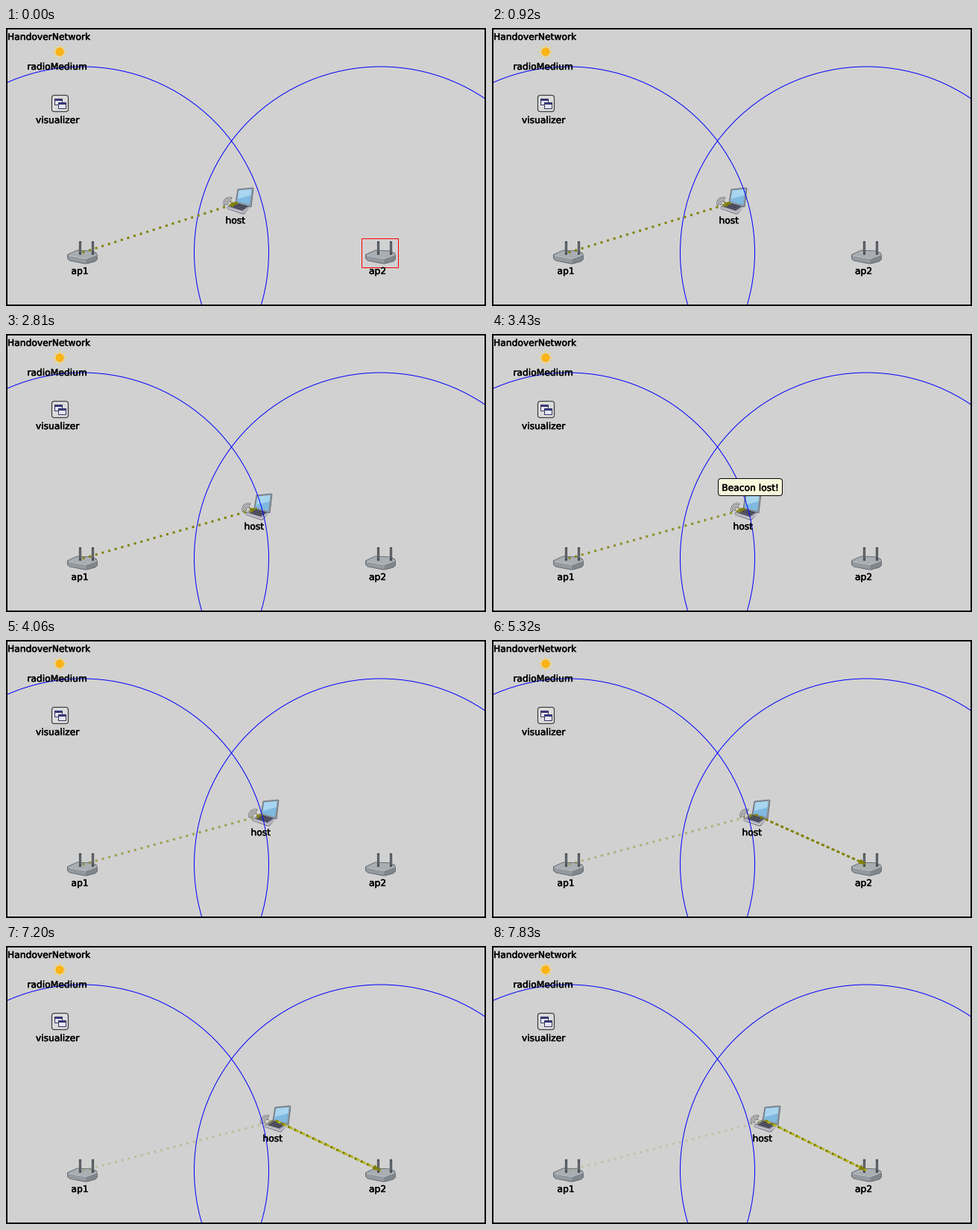
Write a matplotlib script that moves like this. It is 644 by 374 pixels and loops after 8000 ms.

```python
import math

import numpy as np
import matplotlib.pyplot as plt
from matplotlib.animation import FuncAnimation
from matplotlib.patches import Circle, FancyBboxPatch, Polygon, Rectangle
from matplotlib.patheffects import withStroke
from matplotlib.transforms import Affine2D

W, H, DPI = 644, 374, 100
PX = 72 / DPI
LOOP, STEP = 8000, 20
OLIVE = "#808000"
AP1, AP2 = (102.5, 302), (502.5, 302)
HOST_Y = 232

# Start of every simulation step (ms) and the host's centre during it.
STARTS = [0, 500, 920, 1550, 2180, 2810, 3430, 4060, 4690, 5320, 5950, 6580,
          7200, 7830]
HOST_X = [312, 317, 322, 327, 332, 337, 341, 346, 350, 353, 357, 357, 362, 367]
LOST, HANDOVER, ASSOCIATED = 6, 9, 11

plt.rcParams["font.family"] = "DejaVu Sans"
fig = plt.figure(figsize=(W / DPI, H / DPI), dpi=DPI, facecolor="#d1d1d1")
ax = fig.add_axes([0, 0, 1, 1])
ax.set_xlim(0, W)
ax.set_ylim(H, 0)
ax.axis("off")


def poly(points, fill, edge="none", width=0.8, tf=None, z=2):
    p = Polygon(points, closed=True, fc=fill, ec=edge, lw=width * PX, zorder=z)
    if tf is not None:
        p.set_transform(tf)
    return ax.add_patch(p)


def line(points, color, width, tf=None, z=2, **kw):
    xs, ys = zip(*points)
    return ax.plot(xs, ys, color=color, lw=width * PX, zorder=z,
                   transform=tf or ax.transData, **kw)[0]


def label(x, y, s, ha="center", z=6):
    bolder = [withStroke(linewidth=0.5 * PX, foreground="black")]
    return ax.text(x, y, s, fontsize=12.3 * PX, ha=ha, va="baseline",
                   color="black", zorder=z, path_effects=bolder)


def shift(x, y):
    return Affine2D().translate(x, y) + ax.transData


def sun(x, y):
    tips = []
    for k in range(24):
        r = 10 if k % 3 == 1 else 5.5
        a = math.radians(15 * (k - 1))
        tips.append((x + r * math.cos(a), y + r * math.sin(a)))
    poly(tips, "#f9d44a")
    ax.add_patch(Circle((x, y), 6.6, fc="#f3dfa0", ec="none", zorder=2))
    ax.add_patch(Circle((x, y), 5.2, fc="#fbb414", ec="#e8a020", lw=0.5,
                        zorder=2))


def windows(x, y):
    ax.add_patch(FancyBboxPatch((x + 2.5, y + 2.5), 18, 18, fc="#dcdcdc",
                                ec="#3c3c3c", lw=1.2 * PX, zorder=2,
                                boxstyle="round,pad=2,rounding_size=3.5"))
    for dx, dy in ((4.5, 4.5), (9.5, 9.5)):
        ax.add_patch(Rectangle((x + dx, y + dy), 10, 8, fc="#e6e6f6",
                               ec="#34345e", lw=PX, zorder=2))
        ax.add_patch(Rectangle((x + dx, y + dy), 10, 2, fc="#3a3f9c",
                               ec="#34345e", lw=PX, zorder=2))


def access_point(x, y):
    tf = shift(x, y)
    poly([(-20, 3), (-16, 1), (-7, -3), (13, -2), (19, 1), (20, 4), (20, 9),
          (17, 12), (6, 15), (3, 15), (-17, 11), (-20, 8)],
         "#7f868c", "#5b6268", tf=tf)
    poly([(-19, 3), (-7, -2.5), (13, -1.5), (19, 2), (5, 7.5)], "#a9aeb2",
         tf=tf)
    poly([(-19, 3.5), (5, 8), (5, 14.5), (-17, 10.5), (-19, 8)], "#949a9f",
         tf=tf)
    line([(-18, 4), (5, 8.2), (19, 3)], "#c9cdd0", 1, tf)
    for dx in (-3, 13.5):
        line([(dx, -14), (dx, 1)], "#4a4f55", 3.2, tf)
        line([(dx - 0.4, -13), (dx - 0.4, -1)], "#767c83", 0.9, tf)


def laptop(tf):
    poly([(-15, 9), (-4, 2), (16, 8), (7, 18), (5, 18), (-15, 11)],
         "#a8a8b4", "#666674", tf=tf)
    poly([(-11, 8.5), (-3, 3.2), (13, 8), (5, 13.5)], "#3f3f50", tf=tf)
    for k in (0.3, 0.65):
        line([(-11 + 8 * k, 8.5 - 5.3 * k), (5 + 8 * k, 13.5 - 5.5 * k)],
             "#77778a", 0.7, tf)
    line([(-15, 10), (6, 16.5), (16, 8.5)], "#d6d6de", 1, tf)
    poly([(-1, -15), (18.5, -17), (20, -16), (17, 8.5), (15, 8.5), (-4, 3)],
         "#8d97a3", "#5c6672", tf=tf)
    poly([(0.5, -13.5), (17.5, -15), (15, 6), (-2.3, 1.5)], "#7fb9e0", tf=tf)
    poly([(0.5, -13.5), (17.5, -15), (16.6, -7), (-1.2, -2)], "#a8d5ef", tf=tf)
    for r in (3.5, 7.5):
        a = np.radians(np.linspace(165, 285, 14))
        arc = list(zip(-12 + r * np.cos(a), 4 + r * np.sin(a)))
        line(arc, "#55555c", 2.4, tf)
        line(arc, "#e4e4e4", 1, tf)


def arrow(z):
    return poly([(0, 0), (0, 1), (1, 0)], OLIVE, z=z)


def aim(head, start, tip, size=9):
    ux, uy = tip[0] - start[0], tip[1] - start[1]
    n = math.hypot(ux, uy)
    ux, uy = ux / n, uy / n
    bx, by = tip[0] - size * ux, tip[1] - size * uy
    half = size * 0.42
    head.set_xy([tip, (bx - half * uy, by + half * ux),
                 (bx + half * uy, by - half * ux)])


def bubble(x, width, s):
    box = FancyBboxPatch((x + 4.5, 198.5), width - 9, 15, fc="#f8f8dc",
                         ec="black", lw=PX, zorder=8,
                         boxstyle="round,pad=4,rounding_size=4")
    ax.add_patch(box)
    return box, label(x + width / 2, 211, s, z=9)


def link(pattern, z):
    return line([(0, 0), (1, 1)], OLIVE, 3, z=z, linestyle=(0, pattern),
                dash_capstyle="butt")


# Fixed scenery
for ap in (AP1, AP2):
    ax.add_patch(Circle(ap, 250, fc="none", ec="#0000ff", lw=PX, zorder=4))
ax.add_patch(Rectangle((1, 1), W - 2, H - 2, fc="none", ec="black",
                       lw=2 * PX, zorder=5))
sun(72, 32)
windows(61, 90)
for ap in (AP1, AP2):
    access_point(*ap)
label(2, 16, "HandoverNetwork", ha="left")
label(68.5, 56, "radioMedium")
label(69, 128, "visualizer")
label(99, 331, "ap1")
label(498.5, 331, "ap2")

# Moving parts
host_pos = Affine2D()
laptop(host_pos + ax.transData)
host_name = label(307.5, 263, "host")
frame = ax.add_patch(Rectangle((477.5, 282.5), 49, 39, fc="none", ec="#ff0000",
                               lw=PX, zorder=5))
old_link, old_head = link((1, 2), 5), arrow(5)
new_link, new_head = link((1.4, 1.1), 5), arrow(5)
data_link = link((2.4, 0.6), 4.9)
lost = bubble(303, 87, "Beacon lost!")
joined = bubble(303, 127, "Associated with AP")


def draw(i):
    now = i * STEP + STEP // 2
    step = int(np.searchsorted(STARTS, now, side="right")) - 1
    x = HOST_X[step]
    host = (x, HOST_Y + 3)
    host_pos.clear().translate(x, HOST_Y)
    host_name.set_x(x - 4.2)
    frame.set_visible(step == 0)

    fade = min(1, math.exp((338 - x) / 17))
    old_link.set_data([AP1[0], x], [AP1[1], host[1]])
    aim(old_head, AP1, (x - 1, host[1]))
    old_link.set_alpha(fade)
    old_head.set_alpha(fade)

    linked = step >= HANDOVER
    for part in (new_link, new_head):
        part.set_visible(linked)
    data_link.set_visible(step >= ASSOCIATED)
    for part in (new_link, data_link):
        part.set_data([x, AP2[0]], [host[1], AP2[1]])
    aim(new_head, host, (AP2[0] - 1, AP2[1] - 0.5))
    aged = step > ASSOCIATED
    data_link.set_color("#b4b41e" if aged else OLIVE)
    new_link.set_linestyle((0, (1, 2) if aged else (1.4, 1.1)))

    for part in lost:
        part.set_visible(step == LOST)
    for part in joined:
        part.set_visible(step == ASSOCIATED)
    return ()


anim = FuncAnimation(fig, draw, frames=LOOP // STEP, interval=STEP,
                     init_func=lambda: draw(0), repeat=True, repeat_delay=0,
                     blit=False)
plt.show()
```
